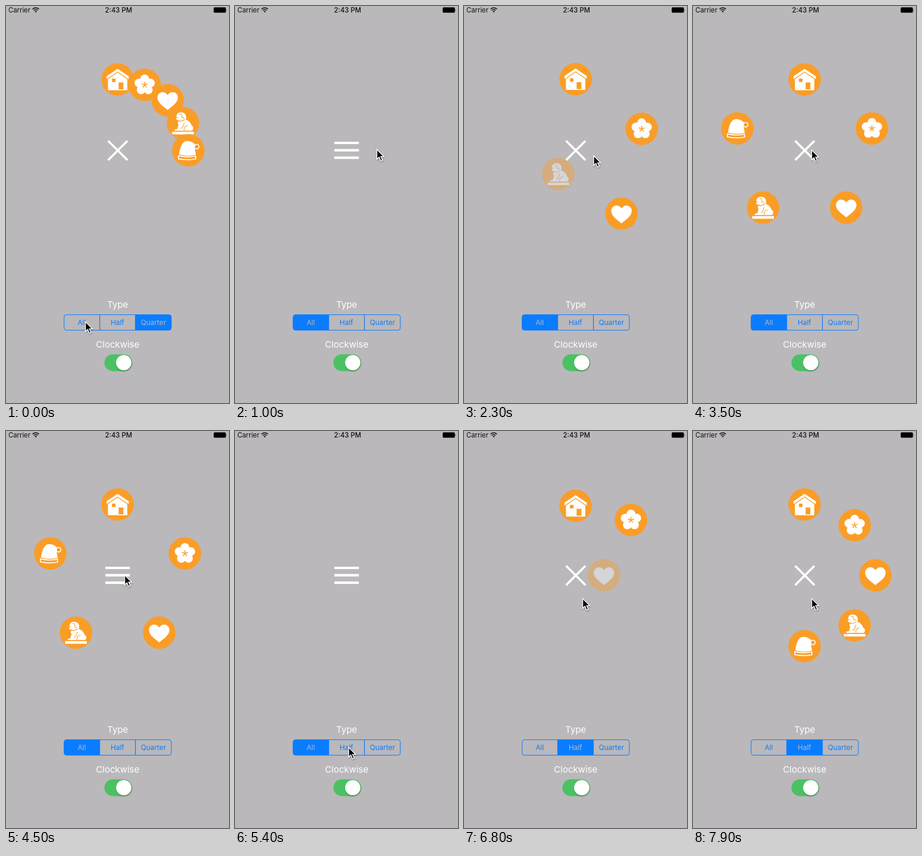
Recreate the animation shown at these times as an HTML page. Size 375 by 667 pixels, loop 8 s.

```html
<!DOCTYPE html>
<html lang="en">
<head>
<meta charset="utf-8">
<title>Circular menu</title>
<style>
html, body { margin: 0; width: 100%; height: 100%; overflow: hidden; background: #bab8bb; }
svg { display: block; width: 375px; height: 667px; font-family: Inter, Roboto, sans-serif; }
.seg { font-size: 11.8px; text-anchor: middle; }
.label { font-size: 15px; fill: #fff; text-anchor: middle; }
</style>
</head>
<body>
<svg viewBox="0 0 375 667">
  <defs>
    <filter id="soft" x="-50%" y="-50%" width="200%" height="200%">
      <feDropShadow dx="0.5" dy="1.5" stdDeviation="1.2" flood-opacity=".35"/>
    </filter>
    <g id="house" fill="#fff">
      <path d="M0-18 18.7-5.5V-.5L0-13.3-18.7-.5V-5.5Z"/>
      <path d="M0-11.8 16.3-.5V18H-16.3V-.5Z"/>
      <path d="M-9.5-1.5h6v5.7h-6zM1.7 5h8v11.5h-8z" fill="#fa9d27"/>
    </g>
    <g id="flower"></g>
    <path id="heart" fill="#fff" d="M0 16.5C-6 11-17.2 5-17.2-4.5C-17.2-14-5-17 0-8.5C5-17 17.2-14 17.2-4.5C17.2 5 6 11 0 16.5Z"/>
    <g id="lion" fill="#fff">
      <path d="M-18.2 14.3H18.2V18.7H-18.2Z"/>
      <path d="M-10-15C-8-19-1-19.5 3-16C6-13 5.5-9 4.5-6.5C10-4 13-1 14.5 4C18 5 18 10 15.5 12.6H-14V10.5L-9.5 9.5L-7.5 2.5C-9.5 0-9-3-6-5H-10L-12-8.5L-8.5-9.5L-11.5-11.5Z"/>
      <path d="M-9-4.5Q-3-1.5 3-6.5M-6-15Q-2-16-2-12T2-9M-3.5 9Q1 6 2-1M2 12Q1 5 8 4" fill="none" stroke="#fa9d27" stroke-width="1.1"/>
    </g>
    <g id="hat" fill="#fff">
      <path d="M-15.5 7C-14.5-3-11-15.5-2.5-15.8C4-16 9-13 12-9L9.5-7C11-3 11.5 2 12.5 7.5Q-2 11-15.5 7Z"/>
      <path d="M-16.5 9.2Q-2 12.7 12 9.5L12.3 14.5Q-2 17.5-16.7 14.2Z" fill="none" stroke="#fff" stroke-width="1.7" stroke-linejoin="round"/>
      <circle cx="14" cy="-6.2" r="3.8" fill="#fa9d27" stroke="#fff" stroke-width="1.6"/>
    </g>
  </defs>
  <rect width="375" height="667" fill="#bab8bb"/>

  <g fill="#111" font-size="11.3">
    <text x="4" y="11">Carrier</text>
    <text x="189.3" y="11" text-anchor="middle" font-weight="500">2:43 PM</text>
    <g fill="none" stroke="#111" stroke-width="1.5">
      <path d="M44.6 5.2Q50 .8 55.4 5.2M46.6 7.4Q50 4.6 53.4 7.4"/>
    </g>
    <path d="M50 11 48.2 9Q50 7.6 51.8 9Z"/>
    <rect x="349.3" y="2.3" width="20.4" height="9" rx="1.6" fill="#000"/>
    <path d="M370.4 5.2q1.4 1.6 0 3.2z" fill="#000"/>
  </g>

  <g id="items"></g>
  <path id="cross" d="M171.7 226.4 204.2 258.9M204.2 226.4 171.7 258.9" stroke="#fff" stroke-width="3.6"/>
  <path id="burger" d="M167 230H208.3M167 242.4H208.3M167 254.9H208.3" stroke="#fff" stroke-width="4.2"/>

  <text class="label" x="187.8" y="507">Type</text>
  <g id="segments"></g>
  <text class="label" x="187.8" y="573.7">Clockwise</text>
  <rect x="165.5" y="585.2" width="46.6" height="28.2" rx="14.1" fill="#4bc164"/>
  <circle cx="198" cy="599.2" r="12.8" fill="#fff" filter="url(#soft)"/>

  <g id="cursor" filter="url(#soft)">
    <path d="M.6 1V17.3L4.4 13.8L7.2 20.2L10 19L7.2 12.8H12.2Z" stroke="#fff" stroke-width="1.3"/>
  </g>
</svg>
<script>
const NS = 'http://www.w3.org/2000/svg';
const LOOP = 8000, CX = 187.7, CY = 242.5, RADIUS = 119;
const BLUE = '#0a7cff', BACK = '#bab8bb', ORANGE = '#fa9d27';
const STAGGER = 150, CLOSE_MS = 400;
const $ = id => document.getElementById(id);

function add(parent, tag, attrs, text) {
  const el = document.createElementNS(NS, tag);
  for (const k in attrs) el.setAttribute(k, attrs[k]);
  if (text) el.textContent = text;
  return parent.appendChild(el);
}

// Each run of the menu: opening and closing time, angle between items
const runs = [
  { open: -3000, close: 200, step: 22.5 },
  { open: 1804, close: 4500, step: 72 },
  { open: 6455, close: 99999, step: 45 }
];
// Selected segment from a given time on
const picks = [[0, 2], [200, 0], [5600, 1]];
// Pointer path: time, x, y
const path = [
  [0, 133, 529.5], [250, 133, 529.5], [950, 238, 240], [1550, 238, 240],
  [1780, 204, 244], [1900, 204, 244], [2300, 217.5, 250.5], [2700, 217.5, 250.5],
  [3300, 199, 241], [4650, 199, 241], [5300, 190.5, 530.5], [5650, 190.5, 530.5],
  [6200, 197, 244], [6480, 197, 244], [6750, 199, 280.5], [LOOP, 199, 280.5]
];

for (let i = 0; i < 5; i++) {
  const turn = `rotate(${i * 72})`;
  add($('flower'), 'ellipse', { cy: -9.8, rx: 7.4, ry: 7.8, fill: '#fff', transform: turn });
}
add($('flower'), 'circle', { r: 8, fill: '#fff' });
for (let i = 0; i < 5; i++) {
  add($('flower'), 'path', { d: 'M0 0V-5.4', stroke: ORANGE, 'stroke-width': 1.5, transform: `rotate(${i * 72})` });
}

const items = ['house', 'flower', 'heart', 'lion', 'hat'].map(name => {
  const g = add($('items'), 'g', {});
  add(g, 'circle', { r: 27.3, fill: ORANGE });
  add(g, 'use', { href: '#' + name });
  return g;
});

const segments = ['All', 'Half', 'Quarter'].map((name, i) => {
  const x = 97.7 + i * 60;
  const d = [
    'M157.6 518.7H101.7Q97.7 518.7 97.7 522.7V540.7Q97.7 544.7 101.7 544.7H157.6Z',
    'M157.6 518.7H217.6V544.7H157.6Z',
    'M217.6 518.7H274Q278 518.7 278 522.7V540.7Q278 544.7 274 544.7H217.6Z'
  ][i];
  const box = add($('segments'), 'path', { d, stroke: BLUE });
  const label = add($('segments'), 'text', { class: 'seg', x: x + 29.7 + (i === 2 ? .6 : 0), y: 536 }, name);
  return { box, label };
});

// Step response of an underdamped spring, ms in, 0..1 out with overshoot
function spring(ms) {
  if (ms <= 0) return 0;
  const zeta = .48, a = zeta * .024, w = .024 * Math.sqrt(1 - zeta * zeta);
  return 1 - Math.exp(-a * ms) * (Math.cos(w * ms) + a / w * Math.sin(w * ms));
}

const smooth = u => u * u * (3 - 2 * u);

function pointer(t) {
  const i = path.findIndex(p => p[0] > t);
  const [t0, x0, y0] = path[i - 1], [t1, x1, y1] = path[i];
  const u = smooth((t - t0) / (t1 - t0));
  return [x0 + (x1 - x0) * u, y0 + (y1 - y0) * u];
}

function draw(t) {
  const run = runs.filter(r => r.open <= t).pop();
  const isOpen = t < run.close;
  const left = 1 - smooth(Math.min(1, Math.max(0, (t - run.close) / CLOSE_MS)));
  items.forEach((g, i) => {
    const out = spring(t - run.open - i * STAGGER) * left;
    const angle = i * run.step * Math.PI / 180;
    const x = CX + RADIUS * out * Math.sin(angle);
    const y = CY - RADIUS * out * Math.cos(angle);
    g.setAttribute('transform', `translate(${x} ${y})`);
    g.setAttribute('opacity', Math.min(1, out));
  });
  $('cross').setAttribute('visibility', isOpen ? 'visible' : 'hidden');
  $('burger').setAttribute('visibility', isOpen ? 'hidden' : 'visible');

  const picked = picks.filter(p => p[0] <= t).pop()[1];
  segments.forEach((s, i) => {
    s.box.setAttribute('fill', i === picked ? BLUE : 'none');
    s.label.setAttribute('fill', i === picked ? BACK : BLUE);
  });
  $('cursor').setAttribute('transform', `translate(${pointer(t)})`);
}

const start = performance.now();
function tick() {
  draw((performance.now() - start) % LOOP);
  requestAnimationFrame(tick);
}
tick();
</script>
</body>
</html>
```
